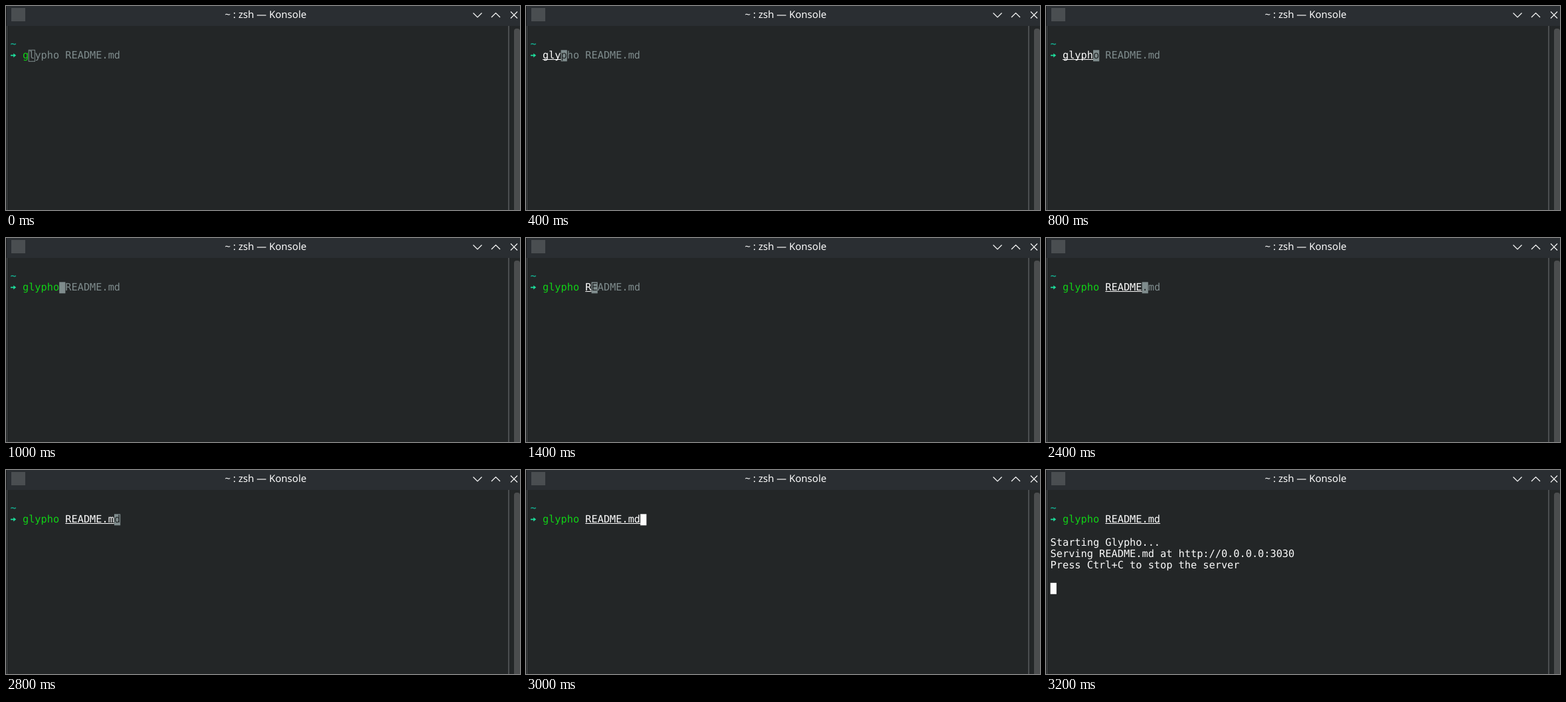
Recreate the animation shown at these times as an HTML page. Size 774 px wide and 307 px high, loop 6.8 s.

```html
<!DOCTYPE html>
<html lang="en">
<head>
<meta charset="utf-8">
<title>Terminal</title>
<style>
  html, body { margin: 0; width: 100%; height: 100%; overflow: hidden; background: #232627; }
  #stage { position: relative; width: 774px; height: 307px; overflow: hidden; background: #232627; }
  #stage > * { position: absolute; }
  svg { left: 0; top: 0; }
  #title {
    left: 0; width: 782px; top: 3px; text-align: center; color: #fcfcfc;
    font: 15px/21px "Noto Sans", sans-serif; white-space: pre;
    text-rendering: geometricPrecision;
  }
  #term {
    left: 6.6px; top: 48.85px; margin: 0; color: #fcfcfc;
    font: 15.28px/17.25px "DejaVu Sans Mono", monospace;
    font-variant-ligatures: none; text-rendering: geometricPrecision;
  }
  .path { color: #16a085; font-weight: bold; }
  .ok { color: #11d116; }
  .arg { text-decoration: underline; text-decoration-skip-ink: none; }
  .hint { color: #7f8c8d; }
  .under { color: #232627; }
</style>
</head>
<body>
<div id="stage">
  <svg width="774" height="307" fill="none">
    <rect width="774" height="30" fill="#2a2e32"/>
    <rect x="8" y="3" width="21" height="20" fill="#4a4e51"/>
    <path d="M703.5 10.5l6.5 6.5 6.5-6.5M731 17l6.5-6.5 6.5 6.5M760 8.5l10 10M770 8.5l-10 10"
      stroke="#fcfcfc" stroke-width="1.2"/>
    <path d="M.5 0V307" stroke="#191b1c"/>
    <path d="M1.5 30V307" stroke="#4b4e50"/>
    <path d="M757 30V307" stroke="#4b4e50" stroke-width="2"/>
    <rect x="765" y="34" width="9" height="290" rx="4" fill="#4b4d4e"/>
    <path d="M7 73.4h4.2v-2.2l4 3.1-4 3.1v-2.2h-4.2z" fill="#1cdc9a"/>
    <rect id="cursor" width="9.2" height="17"/>
  </svg>
  <div id="title">~ : zsh — Konsole</div>
  <pre id="term"></pre>
</div>
<script>
const COMMAND = "glypho README.md";
const OUTPUT = `

Starting Glypho...
Serving README.md at http://0.0.0.0:3030
Press Ctrl+C to stop the server`;
const LOOP = 6800, KEY = 200, CELL = 9.2, LINE = 17.25;
const term = document.getElementById("term");
const cursor = document.getElementById("cursor");
const span = (name, text) => `<span class="${name}">${text}</span>`;

// Complete commands (and the short aliases g, gl) are green, the rest is underlined.
function highlight(typed) {
  const [cmd, arg = ""] = typed.split(" ");
  const known = ["g", "gl", "glypho"].includes(cmd);
  const gap = typed.includes(" ") ? " " : "";
  return span(known ? "ok" : "arg", cmd) + gap + span("arg", arg);
}

function placeCursor(col, row, color, hollow) {
  cursor.setAttribute("x", 6.6 + col * CELL);
  cursor.setAttribute("y", 49.05 + row * LINE);
  cursor.style.fill = hollow ? "none" : color;
  cursor.style.stroke = hollow ? color : "none";
}

function draw(step) {
  const count = Math.min(step + 1, COMMAND.length);
  const done = step >= COMMAND.length;
  const rest = COMMAND.slice(count);
  const hollow = step === 0;
  term.innerHTML = span("path", "~") + "\n  " + highlight(COMMAND.slice(0, count)) +
    span(hollow ? "hint" : "under", rest.slice(0, 1)) + span("hint", rest.slice(1)) +
    (done ? OUTPUT : "");
  if (done) placeCursor(0, 7, "#fcfcfc", false);
  else placeCursor(2 + count, 1, rest ? "#7f8c8d" : "#fcfcfc", hollow);
}

const start = performance.now();
let shown = -1;
function tick() {
  const time = (performance.now() - start) % LOOP;
  const step = Math.min(Math.floor(time / KEY), COMMAND.length);
  if (step !== shown) draw(shown = step);
  requestAnimationFrame(tick);
}
tick();
</script>
</body>
</html>
```
